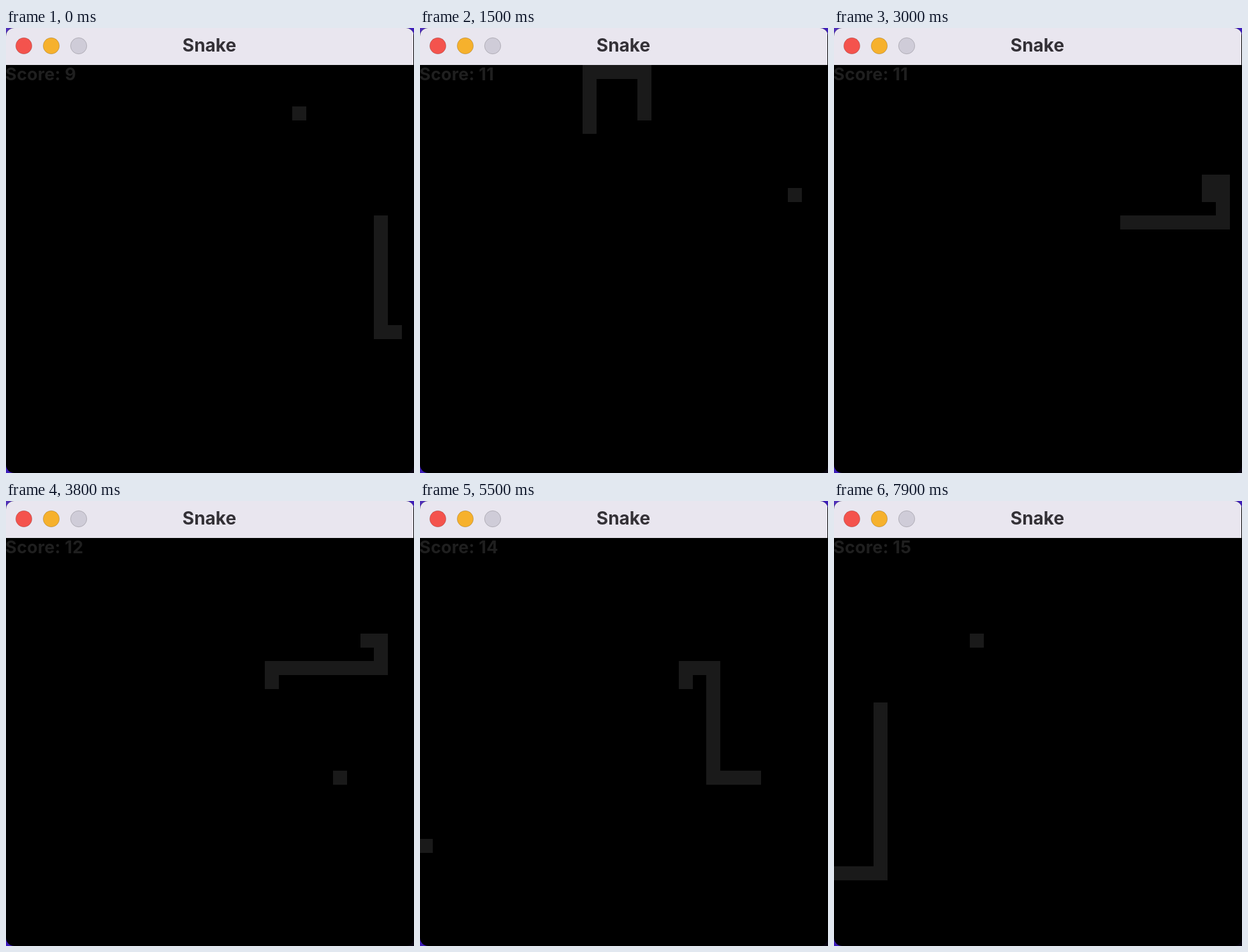
Write an HTML page that moves like this. It is 640 by 698 pixels and loops after 8 s.

```html
<!DOCTYPE html>
<html lang="en">
<head>
<meta charset="utf-8">
<title>Snake</title>
<style>
  html, body { margin: 0; width: 100%; height: 100%; overflow: hidden; }
  body { background: linear-gradient(135deg, #5030b8, #3a1ab8 55%, #08040f); }
  svg { display: block; width: 640px; height: 698px; }
  text { font-family: Inter, Roboto, sans-serif; font-weight: 700; }
</style>
</head>
<body>
<svg viewBox="0 0 640 698">
  <defs>
    <clipPath id="window"><rect width="640" height="698" rx="13"/></clipPath>
  </defs>
  <g clip-path="url(#window)">
    <rect width="640" height="698" fill="#000"/>
    <rect width="639" height="58" fill="#e9e6ef"/>
    <g stroke="#000" stroke-opacity=".18">
      <circle cx="28" cy="28" r="12.7" fill="#f4534d"/>
      <circle cx="71" cy="28" r="12.7" fill="#f6b12d"/>
      <circle cx="114" cy="28" r="12.7" fill="#cfccd8"/>
    </g>
    <text x="319" y="36.5" font-size="28" text-anchor="middle" fill="#343137">Snake</text>
    <text id="score" x="-1" y="81.5" font-size="27" letter-spacing=".2" fill="#1f1f1f"></text>
    <path id="cells" fill="#1a1a1a" shape-rendering="crispEdges"/>
  </g>
</svg>
<script>
const LOOP = 8000, FRAME = 100;
const START_SCORE = 9;
const LATE_FRAME = 34; // from here the game lags one move behind

// Each turn is a direction and a number of cells.
const turns = "L1 U16 L11 U3 L4 D8 R16 D3 L9 U2 R8 U2 L6 D2 R4 D8 L4 U8 L2 D7 L18 D4 L1 D4 R3 U12";
const steps = { L: [-1, 0], R: [1, 0], U: [0, -1], D: [0, 1] };

const route = [[28, 19]];
for (const turn of turns.split(" ")) {
  const [dx, dy] = steps[turn[0]];
  for (let left = +turn.slice(1); left > 0; left--) {
    const [x, y] = route[route.length - 1];
    route.push([x + dx, y + dy]);
  }
}

// Food lies on the route, where the head arrives on these moves.
const meals = [14, 24, 72, 95, 105, 140];
const foods = meals.map(move => route[move + START_SCORE]);
foods.push([10, 7]);

const square = ([col, row]) => {
  const x = Math.round(col * 21.46 - 2.05);
  const y = Math.round(row * 21.43 + 58.4);
  return `M${x} ${y}h22v22h-22z`;
};

const scoreText = document.getElementById("score");
const cells = document.getElementById("cells");
let shown = -1;

function draw(frame) {
  const move = frame * 2 - (frame >= LATE_FRAME ? 1 : 0);
  const eaten = meals.filter(meal => meal <= move).length;
  const score = START_SCORE + eaten;
  const head = move + START_SCORE;
  const body = route.slice(head - score, head + 1);
  cells.setAttribute("d", [...body, foods[eaten]].map(square).join(""));
  scoreText.textContent = `Score: ${score}`;
}

const start = performance.now();
function tick() {
  const frame = Math.floor((performance.now() - start) % LOOP / FRAME);
  if (frame !== shown) draw(shown = frame);
  requestAnimationFrame(tick);
}
tick();
</script>
</body>
</html>
```
